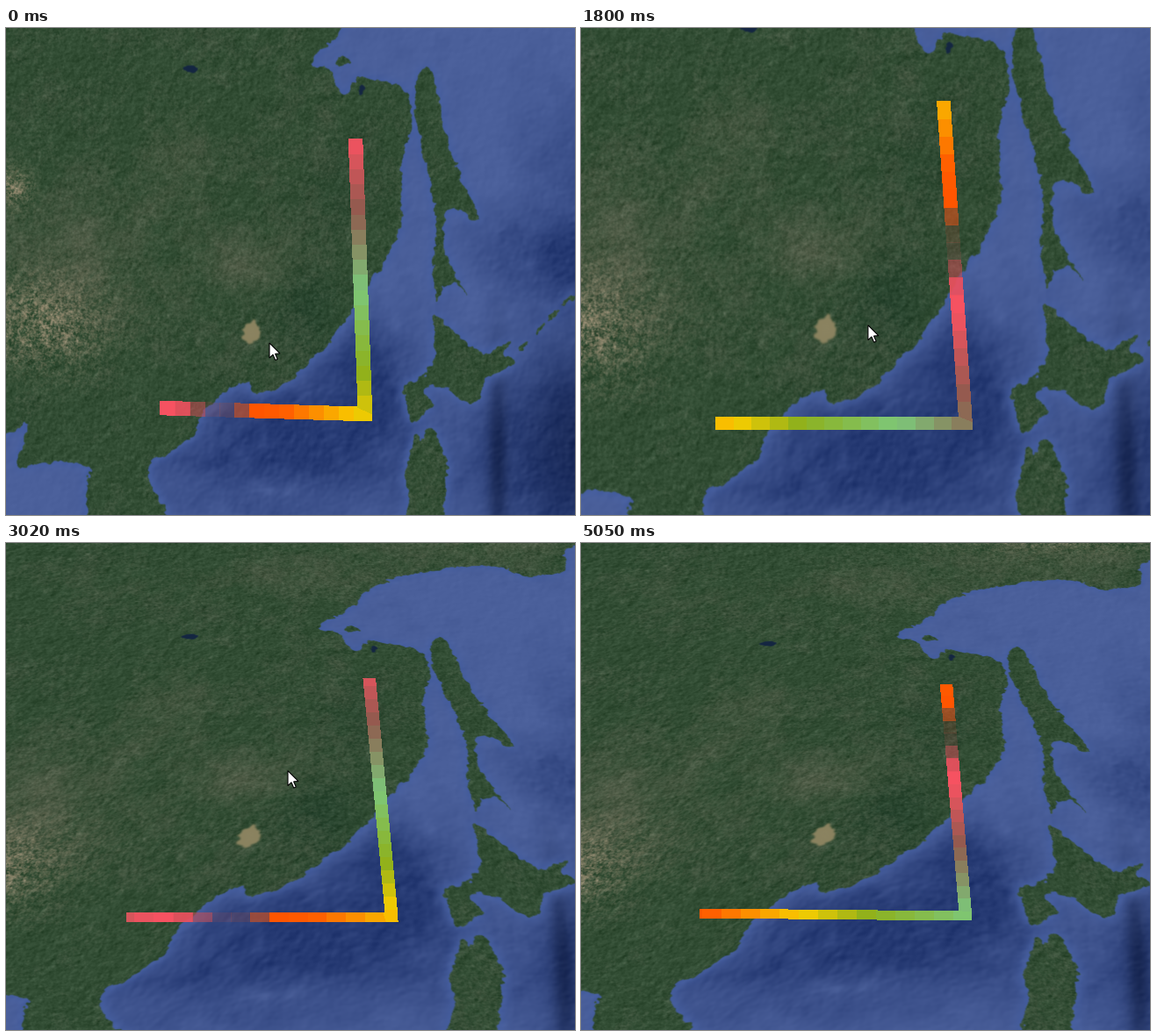
A matplotlib script that plays this animation: 648 by 555 pixels, repeating every 5.15 s.

```python
import numpy as np
import matplotlib.pyplot as plt
from matplotlib.animation import FuncAnimation
from matplotlib.collections import PolyCollection
from matplotlib.colors import to_rgba
from matplotlib.patches import Polygon
from matplotlib.path import Path

W, H = 648, 555
TICK, LOOP = 25, 5150
rng = np.random.default_rng(7)

# ---- timing: evenly spaced redraws between a few anchors -----------------------
ANCHORS = [270, 660, 1180, 1800, 2600, 3410, 4080, 5050]
REDRAWS = np.cumsum([0, 3, 4, 4, 6, 6, 5, 7])
STEPS = np.r_[0, np.interp(np.arange(REDRAWS[-1] + 1), REDRAWS, ANCHORS)]

CAM_T = [190, 520, 1700, 2060, 2600, 2860, 3020, 3120]
CAM_V = [0, 1, 1, 2, 2.63, 2.88, 2.88, 3]
CURSOR_T = [560, 1100, 1700, 2060, 2600, 3560, 3670]
CURSOR_X = [300, 323, 323, 337, 321, 321, 532]
CURSOR_Y = [359, 357, 357, 291, 260, 259, 529]
CURSOR_GONE = 3750
FLOW = 0.3475  # colour cycles per second

# ---- camera: where landmarks fall flat, zoomed, turned and tilted ---------------
FLAT = np.array([(210, 47), (346, 42), (440, -62), (637, -75), (477, 49), (537, 216),
                 (491, 309), (531, 431), (279, 346), (160, 500), (97, 505)], float)
TURNED = np.array([(182, 48), (327, 30), (437, -74), (630, -82), (475, 31), (570, 186),
                   (531, 285), (600, 425), (280, 346), (141, 562), (58, 562)], float)
TILTED = np.array([(213, 115), (358, 107), (445, 56), (635, 47), (495, 121), (577, 236),
                   (536, 306), (598, 430), (276, 332), (100, 510), (22, 518)], float)
VIEWS = [FLAT, FLAT * 1.2 - (57.8, 74.2), TURNED, TILTED]

# Ends and corner of the wall in each view.
WALLS = np.array([[(175, 433), (409, 440), (398, 126)],
                  [(152, 447), (434, 454), (419, 76)],
                  [(156, 461), (449, 441), (397, 104)],
                  [(135, 422), (438, 425), (416, 161)]], float)
BEND = 0.43  # share of the wall before its corner
CELLS = 32
STOPS = [0, .04, .125, .20, .26, .41, .52, .69, .85, 1]
TINTS = np.array([to_rgba(c) for c in (
    "#f65261", "#f65261", "#964a4600", "#ff5500", "#ff5c00",
    "#f8cd00", "#8eb01c", "#7dc77a", "#8f5a4e", "#f65261")])

# ---- key points of the coasts ------------------------------------------------------
MAINLAND = [(760, -140), (655, -118), (637, -75), (600, -66), (556, -83), (498, -80),
            (440, -62), (402, -30), (385, 0), (346, 42), (368, 46), (384, 77),
            (394, 62), (415, 56), (445, 66), (461, 84), (462, 115), (450, 165),
            (447, 236), (412, 292), (370, 355), (325, 403), (285, 417), (273, 403),
            (230, 430), (210, 470), (160, 500), (185, 560), (190, 640), (108, 640),
            (92, 525), (95, 500), (40, 494), (12, 502), (25, 450), (-5, 465),
            (-150, 480), (-150, -280), (760, -280)]
SAKHALIN = [(473, 50), (485, 50), (492, 75), (500, 120), (515, 165), (538, 217),
            (510, 204), (500, 215), (500, 248), (508, 272), (524, 305), (512, 290),
            (500, 294), (491, 311), (487, 270), (490, 215), (475, 140), (467, 95)]
HOKKAIDO = [(487, 327), (512, 348), (545, 370), (575, 358), (566, 371), (577, 384),
            (546, 400), (532, 432), (502, 412), (477, 408), (475, 419), (488, 430),
            (463, 450), (456, 428), (455, 408), (476, 396), (489, 370), (486, 345)]
HONSHU = [(463, 478), (464, 462), (474, 470), (480, 456), (491, 465), (503, 500),
          (497, 550), (500, 640), (450, 640), (458, 540), (455, 505)]

# ---- soft patches of tone: x, y, x radius, y radius, strength ------------------------
PLAINS = [(80, 270, 100, 90, .75), (190, 165, 40, 60, .7), (290, 270, 90, 35, .75),
          (330, -50, 240, 40, .4), (560, -130, 160, 40, .6)]
TANS = [(5, 182, 22, 22, .7), (45, 335, 65, 50, .7), (570, -165, 150, 28, .5)]
WOODS = [(345, 310, 40, 60, .9), (385, 180, 40, 60, .4)]
DEEPS = [(320, 480, 170, 70, 1), (415, 390, 50, 60, .9), (645, 260, 95, 48, 1),
         (640, 150, 60, 80, .35), (640, 490, 90, 130, 1)]
ABYSS = [(560, 490, 11, 110, .7), (660, 470, 70, 100, .6)]
RIDGES = [(310, 525, 60, 16, .55), (200, 515, 30, 16, .4)]

# ---- terrain texture ------------------------------------------------------------------
S = 1.5
X0, Y0, X1, Y1 = -90, -235, 745, 605
gx, gy = np.meshgrid(np.arange(X0, X1, 1 / S), np.arange(Y0, Y1, 1 / S))
freq = S * np.hypot(np.fft.fftfreq(gx.shape[0])[:, None],
                    np.fft.rfftfreq(gx.shape[1])[None])


def filtered(a, gain):
    return np.fft.irfft2(np.fft.rfft2(a) * gain, s=a.shape)


def noise(low, high, slope=1.5):
    n = filtered(rng.normal(size=gx.shape), np.exp(-(freq / high) ** 2) / (freq + low) ** slope)
    return (n - n.mean()) / n.std()


def blur(a, r):
    return filtered(a, np.exp(-2 * (np.pi * r * freq) ** 2))


def emboss(n):
    e = n - np.roll(n, (2, 2), (0, 1))
    return e / e.std()


def patches(spots):
    total = sum(k * np.exp(-((gx - x) / rx) ** 2 - ((gy - y) / ry) ** 2)
                for x, y, rx, ry, k in spots)
    return np.clip(total, 0, 1)


def mix(a, b, amount):
    return a + (np.array(b) - a) * np.clip(amount, 0, 1)[..., None]


def smooth(keys, n=4):
    """Closed Catmull-Rom curve through the key points."""
    p = np.array(keys, float)
    a, c, d = np.roll(p, 1, 0), np.roll(p, -1, 0), np.roll(p, -2, 0)
    rows = [p + t / 2 * (c - a + t * (2 * a - 5 * p + 4 * c - d + t * (3 * (p - c) + d - a)))
            for t in np.arange(n) / n]
    return np.stack(rows, 1).reshape(-1, 2)


def ellipse(x, y, rx, ry, turn=0.0):
    z = np.exp(1j * np.linspace(0, 2 * np.pi, 16))
    z = (rx * z.real + 1j * ry * z.imag) * np.exp(1j * turn)
    return np.c_[x + z.real, y + z.imag]


def inside(shapes, pts):
    hit = np.zeros(len(pts), bool)
    for shape in shapes:
        hit |= Path(shape).contains_points(pts)
    return hit.reshape(gx.shape).astype(float)


def make_terrain():
    rough = np.c_[(gx + 1.4 * noise(.03, .25)).ravel(), (gy + 1.4 * noise(.03, .25)).ravel()]
    islands = [ellipse(580 + 64 * k, 374 - 68 * k, 9, 2.5, -.82) for k in (.15, .45, .68, .92)]
    islands.append(ellipse(385, 39, 9, 5))
    land = inside([smooth(c) for c in (MAINLAND, SAKHALIN, HOKKAIDO, HONSHU)] + islands, rough)
    lake = inside([ellipse(279, 346, 9, 13)], rough)
    dark = inside([ellipse(211, 47, 9, 4.5), ellipse(404, 71, 2.5, 7, .35)], rough)
    broad, fine = noise(.008, .06), noise(.05, .5, .9)
    blank = np.zeros(gx.shape + (3,))

    ground = mix(blank + (50, 77, 52), (39, 67, 46), patches(WOODS) + .15 * broad)
    ground = mix(ground, (80, 92, 71), patches(PLAINS) * .85 + .14 * broad + .08 * fine)
    ground = mix(ground, (142, 132, 106), patches(TANS) * (.6 + .4 * fine))
    ground += (3.5 * emboss(noise(.02, .25, 1.2)) + 3 * fine)[..., None]
    ground = mix(ground, (139, 131, 96), blur(lake, 1))
    ground = mix(ground, (20, 38, 66), blur(dark, .6))

    shelf = np.clip(2.2 * blur(land, 6), 0, 1)
    deep = patches(DEEPS) * (1 - .85 * shelf) * (1 + .1 * broad)
    sea = mix(blank + (75, 96, 155), (37, 57, 114), deep + .04 * broad)
    sea = mix(sea, (18, 32, 72), patches(ABYSS) * (1 - shelf))
    sea = mix(sea, (76, 97, 155), patches(RIDGES) * (.7 + .5 * broad))
    sea = mix(sea, (64, 92, 162), .5 * shelf)
    sea += (3 * emboss(noise(.03, .15)) * (.3 + .7 * deep))[..., None]

    cover = np.clip(blur(land, .55), 0, 1)[..., None]
    return np.clip(sea + (ground - sea) * cover, 0, 255).astype(np.float32)


terrain = make_terrain()


# ---- projection: thin-plate bending from stage to flat map ------------------------------
def kernel(p, q):
    r2 = ((p[:, None] - q[None]) ** 2).sum(2)
    return r2 * np.log(r2 + 1e-12)


def bend(src, dst, pts):
    src, pts = src / 500, pts / 500
    affine = np.c_[np.ones(len(src)), src]
    system = np.block([[kernel(src, src), affine], [affine.T, np.zeros((3, 3))]])
    k = np.linalg.solve(system, np.r_[dst, np.zeros((3, 2))])
    return kernel(pts, src) @ k[:-3] + np.c_[np.ones(len(pts)), pts] @ k[-3:]


sx, sy = np.meshgrid(np.arange(W) + .5, np.arange(H) + .5)
SCREEN = np.c_[sx.ravel(), sy.ravel()]


def blend(views, cam):
    k = min(int(cam), len(views) - 2)
    return views[k] + (views[k + 1] - views[k]) * (cam - k)


def look(cam):
    p = (bend(blend(VIEWS, cam), FLAT, SCREEN) - (X0, Y0)) * S
    rows, cols = terrain.shape[:2]
    x = np.clip(p[:, 0], 0, cols - 1.01)
    y = np.clip(p[:, 1], 0, rows - 1.01)
    i, j = y.astype(int), x.astype(int)
    fx = (x - j).astype(np.float32)[:, None]
    fy = (y - i).astype(np.float32)[:, None]
    top = terrain[i, j] * (1 - fx) + terrain[i, j + 1] * fx
    low = terrain[i + 1, j] * (1 - fx) + terrain[i + 1, j + 1] * fx
    return (top * (1 - fy) + low * fy).astype(np.uint8).reshape(H, W, 3)


scenes = {}


def scene(cam):
    key = round(cam, 3)
    if key not in scenes:
        scenes[key] = look(cam)
    return scenes[key]


# ---- wall ------------------------------------------------------------------------------
def along(u, knots, pts):
    return np.column_stack([np.interp(u, knots, c) for c in np.transpose(pts)])


def wall(cam, phase):
    cuts = np.arange(-2 * CELLS, 3 * CELLS) / CELLS - phase
    mitre = BEND + .014 * np.array([-1, 0, 1])
    u = np.unique(np.r_[0, mitre, 1, cuts[(cuts > 0) & (cuts < 1)]])
    cell = (np.floor(((u[:-1] + u[1:]) / 2 + phase) * CELLS) + .5) / CELLS % 1

    centre = along(u, [0, BEND, 1], blend(WALLS, cam))
    dx, dy = 7.75 - .35 * cam, np.interp(cam, [1, 2], [7.75, 5])
    side = along(u, mitre, [(0, dy), (dx, dy), (dx, 0)])
    inner, outer = centre - side, centre + side
    quads = np.stack([inner[:-1], inner[1:], outer[1:], outer[:-1]], axis=1)
    return quads, along(cell, STOPS, TINTS)


# ---- figure ------------------------------------------------------------------------------
fig = plt.figure(figsize=(W / 100, H / 100), dpi=100)
ax = fig.add_axes([0, 0, 1, 1])
ax.axis("off")
ground = ax.imshow(scene(0), extent=(0, W, H, 0), interpolation="nearest", aspect="auto")
ax.set(xlim=(0, W), ylim=(H, 0))
ribbon = PolyCollection([], linewidths=0, antialiaseds=False, zorder=3)
ax.add_collection(ribbon)
ARROW = np.array([(0, 0), (0, 17), (4, 13.2), (6.7, 19.5), (9.3, 18.4), (6.6, 12.3), (12, 12)])
cursor = ax.add_patch(Polygon(ARROW, fc="white", ec="black", lw=.8, zorder=4))


def update(i):
    t = STEPS[STEPS < (i + 1) * TICK][-1]
    cam = float(np.interp(t, CAM_T, CAM_V))
    ground.set_data(scene(cam))
    quads, rgba = wall(cam, 1 - FLOW * t / 1000)
    ribbon.set_verts(quads)
    ribbon.set_facecolor(rgba)
    cursor.set_xy(ARROW + (np.interp(t, CURSOR_T, CURSOR_X), np.interp(t, CURSOR_T, CURSOR_Y)))
    cursor.set_visible(t < CURSOR_GONE)
    return ground, ribbon, cursor


anim = FuncAnimation(fig, update, frames=LOOP // TICK, interval=TICK,
                     repeat=True, repeat_delay=0, cache_frame_data=False)
plt.show()
```
